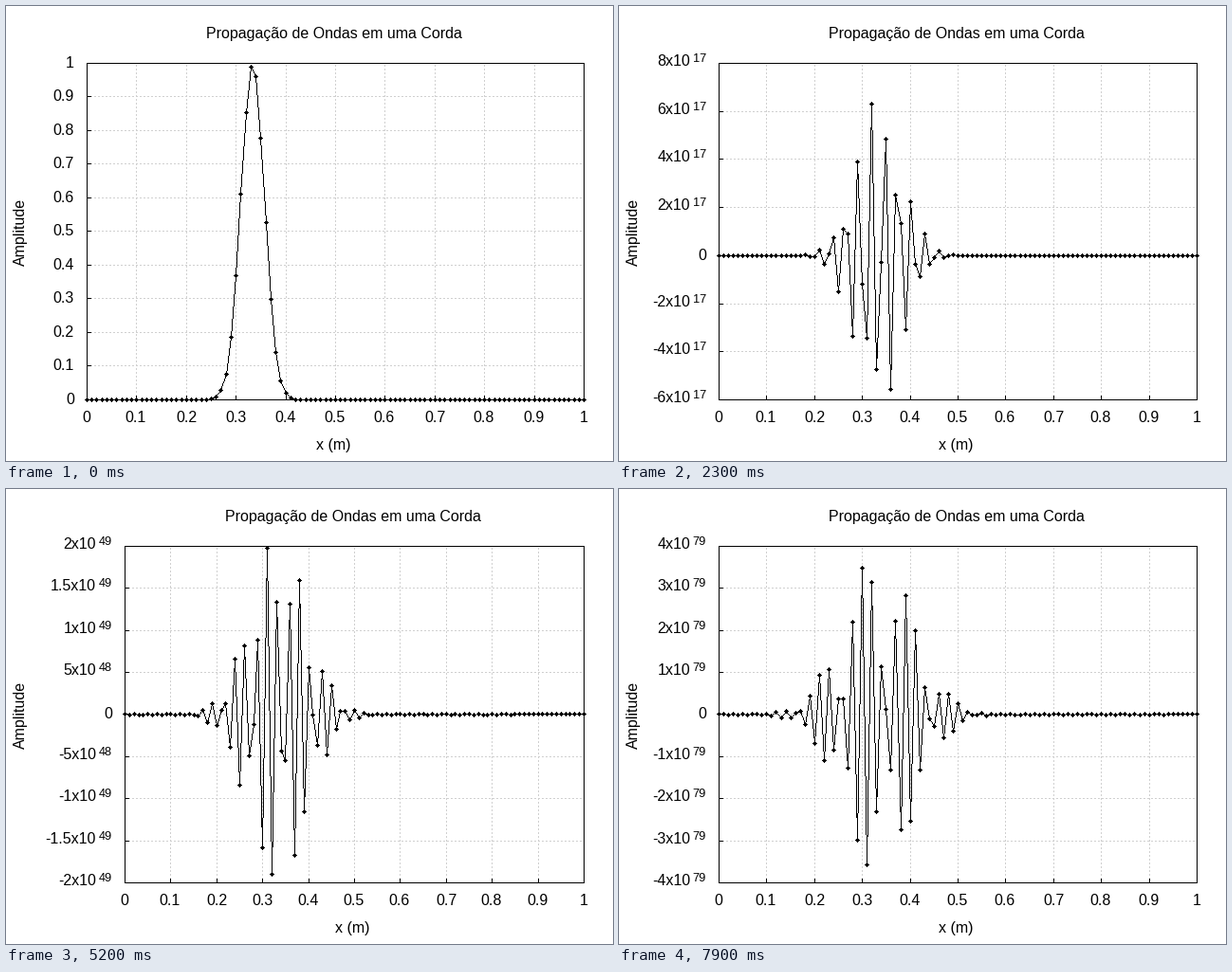
Recreate the animation shown at these times as a matplotlib script. Size 640x480 px, loop 8000 ms.

```python
import math

import numpy as np
import matplotlib.pyplot as plt
from matplotlib.animation import FuncAnimation

plt.rcParams["font.family"] = "Liberation Sans"

W, H, DPI = 640, 480, 80
PX = 72 / DPI
TOP, BOTTOM, RIGHT = 60, 415, 609
FRAMES, COURANT = 80, 2.0
BLACK, GRID = 0, 208

fig = plt.figure(figsize=(W / DPI, H / DPI), dpi=DPI, facecolor="white")
canvas = np.full((H, W, 3), 255, np.uint8)
picture = fig.figimage(canvas, 0, 0, origin="upper")


def simulate():
    """Explicit wave equation beyond its stability limit, string at rest."""
    x = np.linspace(0, 1, 101)
    y = np.exp(-(30 * (x - 1 / 3)) ** 2)
    old, r2 = y.copy(), COURANT ** 2
    steps = [y]
    for _ in range(FRAMES - 1):
        new = y.copy()
        new[1:-1] = 2 * (1 - r2) * y[1:-1] - old[1:-1] + r2 * (y[2:] + y[:-2])
        old, y = y, new
        steps.append(y)
    return x, steps


def tick_values(lo, hi):
    power = 10.0 ** math.floor(math.log10(hi - lo))
    count = 20 * power / (hi - lo)
    step = power * (0.2 if count > 10 else 0.5 if count > 4 else 1)
    return [k * step for k in range(math.floor(lo / step), math.ceil(hi / step) + 1)]


def split_label(v):
    mant, _, exp = f"{v:.6g}".partition("e")
    return (mant + "x10", str(int(exp))) if exp else (mant, "")


def label_length(label):
    return len(label[0].lstrip("-")) + int(0.8 * len(label[1]))


def to_px(frac, size):
    return np.floor(np.asarray(frac) * size + 0.5).astype(int)


def line(x0, y0, x1, y1, color=BLACK, dotted=False):
    """One-pixel line without smoothing."""
    n = max(abs(x1 - x0), abs(y1 - y0))
    t = np.arange(n + 1)
    if dotted:
        t = t[t % 4 < 2]
    f = t / n
    xs = np.floor(x0 + (x1 - x0) * f + 0.5).astype(int)
    ys = np.floor(y0 + (y1 - y0) * f + 0.5).astype(int)
    canvas[ys, xs] = color


def diamond(x, y, r=2):
    for dy in range(-r, r + 1):
        w = r - abs(dy)
        canvas[y + dy, x - w:x + w + 1] = BLACK


def text(x, y, s, size=16, ha="center", **kw):
    """Text whose baseline is the upper edge of pixel row y."""
    fig.text(x / W, 1 - y / H, s, fontsize=size * PX, ha=ha, va="baseline", **kw)


def draw_y_label(left, row, label):
    mant, exp = label
    if exp:
        text(left - 13, row - 1, exp, 12.8, "right")
        text(left - 16 - 7 * len(exp), row + 3, mant, ha="right")
    else:
        text(left - 13, row + 5, mant, ha="right")


X, STEPS = simulate()


def draw(i):
    for t in list(fig.texts):
        t.remove()
    canvas[:] = 255

    y = STEPS[i]
    ticks = tick_values(y.min(), y.max())
    lo, hi = ticks[0], ticks[-1]
    labels = [split_label(v) for v in ticks]
    left = 55 + 10 * max(map(label_length, labels))
    mid = (left + RIGHT) / 2

    def col(v):
        return left + to_px(v, RIGHT - left)

    def row(v):
        return BOTTOM - to_px((np.asarray(v) - lo) / (hi - lo), BOTTOM - TOP)

    cols, rows = col(np.arange(11) / 10), row(ticks)
    for c in cols:
        line(c, BOTTOM, c, TOP, GRID, dotted=True)
    for r in rows:
        line(left, r, RIGHT, r, GRID, dotted=True)

    px, py = col(X), row(y)
    for a in range(len(X) - 1):
        line(px[a], py[a], px[a + 1], py[a + 1])
    for p in zip(px, py):
        diamond(*p)

    for r in (TOP, BOTTOM):
        line(left, r, RIGHT, r)
    for c in (left, RIGHT):
        line(c, TOP, c, BOTTOM)
    for k, c in enumerate(cols):
        line(c, BOTTOM, c, BOTTOM - 4)
        text(c, 439, f"{k / 10:g}")
    for r, label in zip(rows, labels):
        line(left, r, left + 4, r)
        draw_y_label(left, r, label)

    text(mid - 1, 34, "Propagação de Ondas em uma Corda")
    text(mid - 2, 468, "x (m)")
    text(20, 238, "Amplitude", rotation=90, rotation_mode="anchor")
    picture.set_data(canvas.copy())
    return []


anim = FuncAnimation(fig, draw, frames=FRAMES, init_func=lambda: [],
                     interval=100, repeat=True, repeat_delay=0)
plt.show()
```
